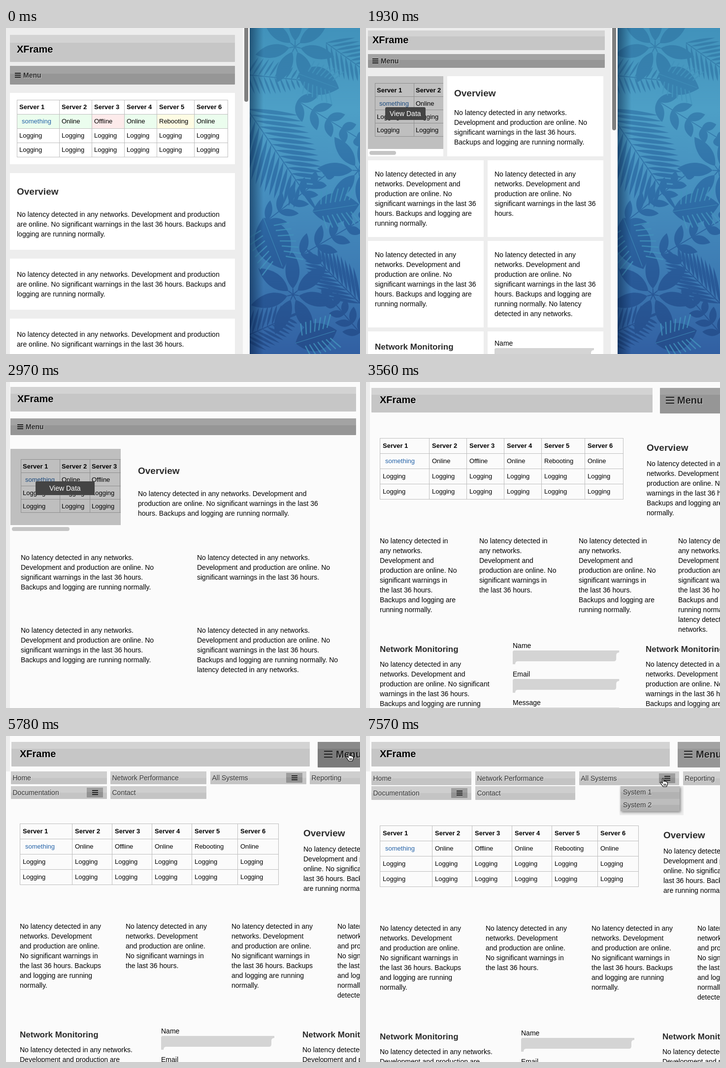
Animation, 719 px wide and 663 px high, one loop 8 s. Source, as an HTML page with a canvas:

```html
<!DOCTYPE html>
<html lang="en">
<head>
<meta charset="utf-8">
<title>XFrame responsive layout</title>
<style>
html, body { margin: 0; width: 719px; height: 663px; overflow: hidden; background: #fbfbfb; }
canvas { display: block; }
</style>
</head>
<body>
<canvas id="stage" width="719" height="663"></canvas>
<script>
const STAGE_W = 719, STAGE_H = 663, LOOP = 8000;
const canvas = document.getElementById('stage');
const ctx = canvas.getContext('2d');
const FONT = '"Liberation Sans", Arial, sans-serif';

const SHORT = 'No latency detected in any networks. Development and production are online. ' +
  'No significant warnings in the last 36 hours.';
const FULL = SHORT + ' Backups and logging are running normally.';
const LONG = FULL + ' No latency detected in any networks.';
const STATUS = ['something', 'Online', 'Offline', 'Online', 'Rebooting', 'Online'];
const TINTS = ['#ebfdee', '#ebfdee', '#fdebeb', '#ebfdee', '#fefce4', '#ebfdee'];

// The picture only changes at these moments.
const STEPS = [0, 440, 590, 740, 890, 1040, 1190, 1930, 2080, 2220, 2370, 2520, 2670, 2820, 2970,
  3110, 3260, 3410, 3560, 3710, 3860, 4450, 5050, 5200, 5350, 5490, 5640, 5780, 5930,
  6670, 6820, 6970, 7120, 7420, 7570];
const WIDTH_KEYS = [[0, 481], [440, 479], [1190, 470], [1930, 497], [2370, 579], [2970, 720],
  [3110, 760], [3860, 880], [4450, 885]];
const CURSOR_X = [[5050, 714], [5350, 690], [6670, 676], [7120, 597]];
const CURSOR_Y = [[5050, 42], [5350, 33], [6670, 44], [7120, 85]];

function track(keys, t) {
  let i = 0;
  while (i < keys.length - 1 && keys[i + 1][0] <= t) i++;
  const [t0, v0] = keys[i];
  if (i === keys.length - 1 || t <= t0) return v0;
  const [t1, v1] = keys[i + 1];
  return v0 + (v1 - v0) * (t - t0) / (t1 - t0);
}

// ---------- wallpaper ----------
function makeWallpaper() {
  const sheet = document.createElement('canvas');
  sheet.width = STAGE_W;
  sheet.height = STAGE_H;
  const g = sheet.getContext('2d');
  const ramp = (...colors) => {
    const fill = g.createLinearGradient(0, 0, 0, STAGE_H);
    colors.forEach((c, i) => fill.addColorStop(i / (colors.length - 1), c));
    return fill;
  };
  const ground = ramp('#4192bb', '#4d9fc6', '#468fbf', '#3d7bb3', '#315fa2');
  const shade = ramp('#357fab', '#3881b0', '#2f6fa8', '#295b99', '#254d8b');

  function leaf(x, y, angle, len, wide) {
    g.save();
    g.translate(x, y);
    g.rotate(angle);
    g.beginPath();
    g.moveTo(0, 0);
    g.bezierCurveTo(len * .3, -wide, len * .7, -wide * .8, len, 0);
    g.bezierCurveTo(len * .7, wide * .8, len * .3, wide, 0, 0);
    g.restore();
    g.fill();
  }
  function stem(x1, y1, x2, y2, width = 2) {
    g.lineWidth = width;
    g.beginPath();
    g.moveTo(x1, y1);
    g.lineTo(x2, y2);
    g.stroke();
  }
  function rosette(x, y, len, count, turn) {
    for (let i = 0; i < count; i++) {
      const a = turn + i * Math.PI * 2 / count;
      const sx = x + Math.cos(a) * 12, sy = y + Math.sin(a) * 12;
      stem(x, y, sx, sy);
      leaf(sx, sy, a, len - 12, len * .24);
    }
  }
  // Paired leaves along a stem; long thin ones make a palm frond.
  function branch(x1, y1, x2, y2, pairs, len, wide, spread) {
    const a = Math.atan2(y2 - y1, x2 - x1);
    stem(x1, y1, x2, y2);
    for (let i = 0; i <= pairs; i++) {
      const u = i / pairs, size = len * (1 - .55 * u * u);
      const x = x1 + (x2 - x1) * u, y = y1 + (y2 - y1) * u;
      leaf(x, y, a - spread, size, wide);
      leaf(x, y, a + spread, size, wide);
    }
    leaf(x2, y2, a, len * .6, wide);
  }
  function monstera(x, y, angle, size) {
    leaf(x - Math.cos(angle) * size, y - Math.sin(angle) * size, angle, size * 2, size * .95);
    g.save();
    g.translate(x, y);
    g.rotate(angle);
    g.strokeStyle = ground;
    g.globalAlpha = .8;
    stem(-size, 0, size * .9, 0, 1);
    for (let i = -3; i < 4; i++) for (const side of [-1, 1])
      stem(i * size * .2, side * size * .25, i * size * .24 + size * .22, side * size * .8, 2.5);
    g.restore();
  }

  g.fillStyle = ground;
  g.fillRect(0, 0, STAGE_W, STAGE_H);
  g.fillStyle = g.strokeStyle = shade;
  rosette(587, 38, 82, 7, .25);
  rosette(716, 290, 84, 7, .5);
  rosette(583, 542, 88, 7, .2);
  branch(490, 95, 590, 105, 9, 42, 3, 1.1);
  branch(490, 165, 596, 320, 13, 105, 6, .85);
  branch(719, 560, 640, 480, 9, 75, 5, .6);
  branch(480, 630, 570, 590, 9, 55, 4, .9);
  branch(650, 30, 719, 80, 7, 60, 4, .8);
  branch(592, 148, 712, 222, 4, 44, 13, .8);
  branch(530, 392, 648, 300, 5, 42, 11, .75);
  branch(600, 462, 722, 390, 4, 46, 13, .8);
  branch(719, 620, 655, 545, 4, 36, 11, .8);
  monstera(635, 108, .35, 44);
  monstera(670, 366, -.15, 48);
  monstera(543, 438, 1.2, 56);
  monstera(630, 628, -.3, 44);
  return sheet;
}
const wallpaper = makeWallpaper();

// ---------- drawing helpers ----------
function rect(x, y, right, bottom, color, radius = 0) {
  ctx.fillStyle = color;
  ctx.beginPath();
  ctx.roundRect(x, y, right - x, bottom - y, radius);
  ctx.fill();
}
function text(str, x, y, size = 14, color = '#000', bold = false, lit = false) {
  ctx.font = `${bold ? 'bold ' : ''}${size}px ${FONT}`;
  if (lit) {
    ctx.fillStyle = 'rgba(255,255,255,.55)';
    ctx.fillText(str, x + 1, y + 1);
  }
  ctx.fillStyle = color;
  ctx.fillText(str, x, y);
}
function paragraph(str, x, y, width) {
  ctx.font = `14px ${FONT}`;
  let line = '';
  for (const word of str.split(' ')) {
    const next = line ? line + ' ' + word : word;
    if (line && ctx.measureText(next).width > width) {
      text(line, x, y);
      y += 20;
      line = word;
    } else line = next;
  }
  text(line, x, y);
}
const heading = (str, x, y, size) => text(str, x, y, size, '#2b2b2b', true);
function bar(x, y, right, bottom, split, light, dark) {
  rect(x, y, right, bottom, dark, 1);
  rect(x, y, right, y + split, light, 1);
}
const titleBar = (x, y, right, bottom, split) => bar(x, y, right, bottom, split, '#d3d3d3', '#c6c6c6');
const menuBar = (x, y, right, bottom, split) => bar(x, y, right, bottom, split, '#a3a3a3', '#969696');
const title = (x, y) => text('XFrame', x, y, 20, '#000', true, true);

function burger(x, y, width = 12, gap = 4) {
  for (let i = -1; i < 2; i++) rect(x, y + i * gap - 1, x + width, y + i * gap + 1, '#222');
}
function menuLabel(x, y) {
  burger(x, y - 5);
  text('Menu', x + 17, y, 14, '#2b2b2b', true, true);
}
function table(xs, y, rowH, inset, base, tinted) {
  const right = xs[6], bottom = y + rowH * 4;
  if (tinted) TINTS.forEach((c, i) => rect(xs[i], y + rowH, xs[i + 1], y + rowH * 2, c));
  for (const x of xs) rect(x, y, x + 1, bottom + 1, '#bfbfbf');
  for (let r = 0; r < 5; r++) rect(xs[0], y + r * rowH, right + 1, y + r * rowH + 1, '#bfbfbf');
  for (let c = 0; c < 6; c++) {
    const x = xs[c] + inset;
    text('Server ' + (c + 1), x, y + base, 13, '#000', true);
    text(STATUS[c], c ? x : x + 5, y + rowH + base, 13, c ? '#000' : '#2563a8');
    for (let r = 2; r < 4; r++) text('Logging', x, y + r * rowH + base, 13);
  }
}
function field(label, x, y, width) {
  text(label, x, y);
  ctx.save();
  ctx.translate(x, y + 5);
  ctx.fillStyle = '#d4d4d4';
  ctx.beginPath();
  ctx.moveTo(2, 0);
  ctx.lineTo(width, 0);
  ctx.lineTo(width, 4);
  ctx.quadraticCurveTo(width - 6, 4, width - 6, 10);
  ctx.lineTo(width - 6, 17);
  ctx.quadraticCurveTo(width - 6, 22, width - 11, 22);
  ctx.lineTo(10, 22);
  ctx.quadraticCurveTo(5, 22, 5, 28);
  ctx.lineTo(0, 28);
  ctx.lineTo(0, 2);
  ctx.fill();
  ctx.restore();
}
function clipped(x, y, right, bottom, draw) {
  ctx.save();
  ctx.beginPath();
  ctx.rect(x, y, right - x, bottom - y);
  ctx.clip();
  draw();
  ctx.restore();
}

// ---------- layouts ----------
function stacked() {
  titleBar(8, 14, 465, 69, 16);
  title(22, 50);
  menuBar(8, 77, 465, 115, 16);
  menuLabel(18, 101);
  for (const [y, bottom] of [[132, 277], [295, 451], [469, 573], [591, 700]]) rect(8, y, 465, bottom, '#fff');
  table([22, 108, 174, 240, 306, 382, 450], 146, 29, 5, 19, true);
  heading('Overview', 22, 339, 19);
  paragraph(FULL, 22, 384, 429);
  paragraph(FULL, 22, 506, 429);
  paragraph(SHORT, 22, 628, 429);
}

function twoColumns(w, cardColor) {
  // Value at page widths 497, 579 and 720, blended for the current one.
  const v = (a, b, c) => Math.round(w < 579 ? a + (b - a) * (w - 497) / 82 : b + (c - b) * (w - 579) / 141);
  const left = v(4, 5, 9), pad = v(14, 17, 21), right = v(482, 564, 711);
  const split = v(12, 13, 14);

  titleBar(left, v(5, 6, 10), v(485, 566, 711), v(45, 50, 60), split);
  title(v(13, 16, 23), v(31, 34, 41));
  menuBar(left, v(53, 60, 74), v(485, 566, 711), v(81, 90, 108), split);
  menuLabel(v(13, 16, 23), v(72, 80, 96));

  const top = v(98, 111, 136), bottom = v(246, 269, 291), dataRight = v(157, 184, 233);
  rect(left, top, dataRight, bottom + 15, cardColor);
  clipped(left, top, dataRight, bottom, () => {
    rect(left, top, dataRight, bottom, '#fff');
    const xs = [0, 79, 140, 201, 262, 333, 397].map(x => x + left + pad);
    table(xs, top + pad, 27, 4, 19);
    rect(left, top, dataRight, bottom, 'rgba(0,0,0,.25)');
  });
  rect(left + 3, bottom + 4, v(61, 82, 129), bottom + 12, '#c5c5c5', 4);
  rect(v(39, 46, 60), v(161, 178, 202), v(121, 141, 180), v(187, 204, 230), '#444', 3);
  text('View Data', v(48, 62, 88), v(179, 196, 221), 14, '#fff');

  const overX = v(165, 194, 247);
  rect(overX, top, right, bottom + 15, cardColor);
  heading('Overview', overX + pad, v(139, 156, 187), 19);
  paragraph(FULL, overX + pad, v(177, 196, 232), v(289, 336, 390));

  const cols = [[left, v(239, 280, 353)], [v(247, 290, 367), right]];
  const rows = [[v(269, 294, 322), v(425, 436, 456)], [v(433, 446, 470), v(609, 608, 623)], [v(617, 618, 637), 700]];
  const copy = [[FULL, SHORT], [FULL, LONG]];
  rows.forEach(([y, end], r) => cols.forEach(([x, xEnd], c) => {
    rect(x, y, xEnd, end, cardColor);
    if (r < 2) paragraph(copy[r][c], x + pad, y + pad + 19, xEnd - x - 2 * pad);
    else if (c) field('Name', x + pad, y + pad + 15, xEnd - x - 2 * pad - 5);
    else heading('Network Monitoring', x + pad, y + pad + 23, 17);
  }));
}

function navItem(label, x, y, w, h, button) {
  clipped(x, y, x + w, y + h, () => {
    bar(x, y, x + w, y + h, h / 2, '#cecece', '#c4c4c4');
    text(label, x + 3.5, y + h / 2 + 5, 14, '#333', false, true);
    if (button) {
      const mid = Math.round(y + h / 2);
      bar(x + w - 41, mid - 10, x + w - 8, mid + 10, 9, '#9e9e9e', '#929292');
      burger(x + w - 30, mid);
    }
  });
}
function navigation(open) {
  const stretch = open ** .7, w = Math.round(203 * stretch), pitch = 211 * stretch, h = 28 * open;
  const rowY = 72 + 30 * Math.min(1, open + .06), x0 = open < 1 ? 10 : 11;
  const at = i => Math.round(x0 + pitch * i);
  navItem('Home', at(0), 72, w, h);
  navItem('Network Performance', at(1), 72, w, h);
  navItem('All Systems', at(2), 72, w, h, true);
  navItem('Reporting', at(3), 72, w, h);
  navItem('Documentation', at(0), rowY, w, h, true);
  navItem('Contact', at(1), rowY, w, h);
}
function submenu(open) {
  clipped(510, 102, 650, 102 + 60 * open, () => {
    rect(515, 102, 645, 161, '#ededed');
    ctx.save();
    ctx.shadowColor = 'rgba(0,0,0,.45)';
    ctx.shadowBlur = 5;
    ctx.shadowOffsetX = ctx.shadowOffsetY = 2;
    rect(517, 102, 637, 153, '#b4b4b4');
    ctx.restore();
    [102, 128].forEach((y, i) => {
      bar(517, y, 637, y + 25, 12, '#bdbdbd', '#b2b2b2');
      text('System ' + (i + 1), 522, y + 17, 14, '#333', false, true);
    });
  });
}
function hand(x, y) {
  ctx.save();
  ctx.translate(x, y);
  const shape = new Path2D('M5 2Q6-.5 7.5 2V7Q9 5.500 10 7.500Q12 6.500 13 8.500Q15.500 8 15.500 10.500V13L13.500 18H6.500L1 10.500Q.5 8 3 9L5 11Z');
  ctx.fillStyle = '#fff';
  ctx.fill(shape);
  ctx.strokeStyle = '#000';
  ctx.lineWidth = 1.2;
  ctx.stroke(shape);
  ctx.fillStyle = '#000';
  for (const fx of [7.500, 9.500, 11.500]) ctx.fillRect(fx, 12, 1, 4);
  ctx.restore();
}

function wide(w, t) {
  const X = x => Math.round(x * (1 + (w / 885 - 1) * Math.max(0, x - 28) / x));
  const u = Math.min(1, Math.max(0, (t - 5400) / 450));
  const open = .5 - .5 * Math.cos(u * Math.PI);
  const drop = Math.round(68 * open), scale = w / 885;

  titleBar(11, 12, X(617), 62, 14);
  title(28, 43);
  if (t >= 5050 && t < 6820) bar(X(633), 12, X(872), 64, 14, '#8a8a8a', '#7b7b7b');
  else menuBar(X(633), 12, X(872), 64, 14);
  burger(X(646), 37, 17, 6);
  text('Menu', X(670), 44, 20, '#222', true, true);

  ctx.save();
  ctx.translate(0, drop);
  table([28, 134, 215, 296, 377, 470, 553].map(X), 114, 31, 6, 20);
  heading('Overview', X(604), 140, 19);
  paragraph(FULL, X(604), 171, 239 * scale);
  [FULL, SHORT, FULL, LONG].forEach((copy, i) => paragraph(copy, X(28 + 215 * i), 328, 170 * scale));
  for (const x of [28, 602]) {
    heading('Network Monitoring', X(x), 549, 17);
    paragraph(FULL, X(x), 579, 239 * scale);
  }
  ['Name', 'Email', 'Message'].forEach((label, i) => field(label, X(315), 541 + 58 * i, 230 * scale));
  ctx.restore();

  if (open > 0) navigation(open);
  if (t >= 7420) submenu(t < 7570 ? .5 : 1);
  if (t >= 5050) {
    const held = t < 6670 ? Math.min(t, 5350) : t;
    hand(track(CURSOR_X, held), track(CURSOR_Y, held));
  }
}

// ---------- scene ----------
function draw(time) {
  const now = time % LOOP;
  const t = STEPS.findLast(step => step <= now);
  const w = Math.round(track(WIDTH_KEYS, t)), edge = w + 14;
  const light = w > 660;

  if (edge < STAGE_W) {
    ctx.drawImage(wallpaper, 0, 0);
    const shadow = ctx.createLinearGradient(edge, 0, edge + 28, 0);
    shadow.addColorStop(0, 'rgba(0,20,50,.5)');
    shadow.addColorStop(1, 'rgba(0,20,50,0)');
    rect(edge, 0, edge + 28, STAGE_H, shadow);
  }
  rect(0, 0, edge, STAGE_H, light ? '#fbfbfb' : '#ededed');
  if (light) rect(0, 0, 8, t < 5490 ? STAGE_H : 72, '#ededed');

  if (w < 490) stacked();
  else if (w < 790) twoColumns(w, light ? '#fbfbfb' : '#fff');
  else wide(w, t);

  if (edge < STAGE_W) {
    rect(w, 0, edge, STAGE_H, '#fafafa');
    rect(w + 3, -8, w + 11, w < 490 ? 150 : 208 + (w - 497) * .12, '#7f7f7f', 4);
  }
}
function loop() {
  draw(performance.now());
  requestAnimationFrame(loop);
}
loop();
</script>
</body>
</html>
```
